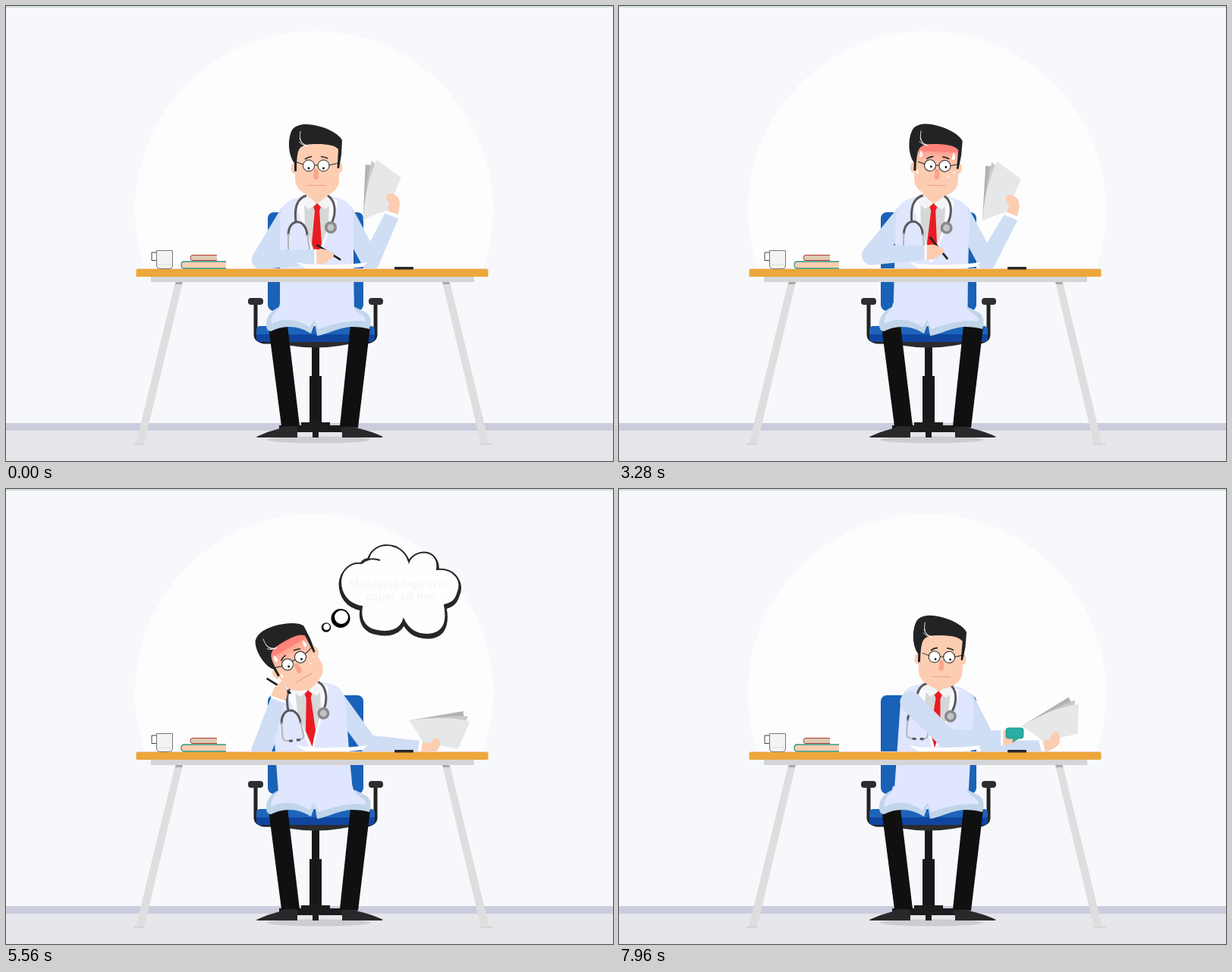
Write an HTML page that moves like this. It is 800 px wide and 600 px high and loops after 8000 ms.

```html
<!DOCTYPE html>
<html lang="en">
<head>
<meta charset="utf-8">
<title>Doctor at the desk</title>
<style>
  html, body { margin: 0; height: 100%; overflow: hidden; background: #f7f8fc; }
  svg { display: block; width: 100vw; height: 100vh; }
  text { font: 14px Inter, "Open Sans", sans-serif; text-anchor: middle; fill: #222; }
  .line { fill: none; stroke: #222; }
  .white { stroke: #fff; }
  .sleeve { fill: #cfdef4; }
  .skin { fill: #fccdb1; }
  .coat { fill: #dfe6fd; }
</style>
</head>
<body>
<svg viewBox="0 0 800 600">
  <defs>
    <clipPath id="aboveDesk"><rect width="800" height="347"/></clipPath>
    <linearGradient id="heat" gradientUnits="userSpaceOnUse" x1="0" y1="180" x2="0" y2="222">
      <stop offset="0" stop-color="#fe7f78"/>
      <stop offset=".29" stop-color="#fe857c"/>
      <stop offset=".3" stop-color="#fda391"/>
      <stop offset="1" stop-color="#fccdb1" stop-opacity="0"/>
    </linearGradient>
    <path id="puff" d="M468 98Q471 92 478 92C482 69 522 66 531 96C538 78 572 78 568 106C590 104 603 120 595 138C592 148 586 151 578 153C583 178 575 192 555 192C540 192 530 185 524 172C520 186 505 190 490 187C473 185 466 172 469 155C450 152 441 138 441 122C442 106 455 96 468 98Z" stroke="#000"/>
  </defs>

  <!-- Room -->
  <rect width="800" height="600" fill="#f7f8fc"/>
  <rect width="800" height="2" fill="#cfdcdb"/>
  <circle cx="406" cy="269" r="236" fill="#fdfdfe" clip-path="url(#aboveDesk)"/>
  <rect y="550" width="800" height="10" fill="#cbccdd"/>
  <rect y="560" width="800" height="40" fill="#e6e7eb"/>

  <!-- Chair -->
  <ellipse cx="412" cy="572" rx="68" ry="4.5" fill="#cdcdd0"/>
  <rect x="345" y="272" width="126" height="130" rx="8" fill="#1962b8"/>
  <path d="M403 448h10v40h3v64h-16v-64h3z" fill="#171918"/>
  <path d="M389 549h38v4h31v9h-46v7h-8v-7h-44v-9h29z" fill="#1b1c1c"/>
  <path d="M329 392V433Q329 441 340 443H476Q487 441 487 433V392" class="line" stroke-width="5"/>
  <path d="M336 441H481L440 448Q408 453 376 448Z" fill="#2b2b2d"/>
  <rect x="319" y="385" width="20" height="9" rx="4" fill="#2e2e30"/>
  <rect x="478" y="385" width="19" height="9" rx="4" fill="#2e2e30"/>
  <rect x="330" y="422" width="156" height="21" rx="5" fill="#1d64ba"/>
  <path d="M330 433H486V438Q486 443 481 443H335Q330 443 330 438Z" fill="#0f459f"/>

  <!-- Trousers and shoes -->
  <path d="M346 423L371 421L387 554H363ZM454 421L480 423L464 556L440 554Z" fill="#101010"/>
  <path d="M330 568Q345 561 361 557Q373 551 384 556V569H331ZM440 557Q453 552 465 557Q482 561 497 568L495 569H443V563Z" fill="#29292b"/>

  <!-- Body -->
  <path id="upperR" class="sleeve"/>
  <path id="upperLBack" class="sleeve"/>
  <g id="torso">
    <path class="coat" d="M361 402V285C361 264 368 257 384 253L396 250H425L437 253C452 257 458 265 458 285V347L459 402Z"/>
    <path d="M385 256L395 250H425L437 257L436 268L411 338L407 338L384 268Z" fill="#fafbfd"/>
    <path d="M393 260H426L425 290L412 326H406L394 290Z" fill="#d6d7d8"/>
    <path class="skin" d="M396 238H424V252L410 262L396 252Z"/>
    <path d="M396 249L410 261L399 268L388 258ZM425 249L410 261L421 268L432 258Z" fill="#f3f4f5"/>
    <path d="M410 260L415 265L413 270L416 313L410 335L403 313L407 270L405 265Z" fill="#ea1b23"/>
    <g class="line" stroke-width="3">
      <path d="M396 250C383 254 380 266 382 285M424 250C434 256 436 272 429 287M372 302C372 279 396 279 397 303" stroke="#59595c"/>
      <path d="M372 300V320Q373 325 381 325M397 301L400 320Q399 324 392 325" stroke="#b3b4b8" stroke-width="2"/>
      <path d="M380 325h5M390 324.5h5" stroke="#555"/>
    </g>
    <circle cx="428" cy="292" r="8" fill="#89898b"/>
    <circle cx="428" cy="292" r="4.5" fill="#c3c3c5"/>
  </g>
  <path d="M360 397C348 402 342 412 343 421Q343 428 349 429C366 420 385 421 402 432L407 418L410 435C426 432 438 424 455 423Q469 423 479 426Q484 410 474 404L460 397Z" fill="#c1d5ea"/>
  <path class="coat" d="M361 392C360 403 347 407 350 419C366 410 387 413 400 424L406 414L412 426C430 420 452 413 474 416C475 406 458 406 457 392Z"/>

  <!-- Head -->
  <g id="head">
    <ellipse class="skin" cx="379.5" cy="214" rx="4" ry="7"/>
    <ellipse class="skin" cx="439.5" cy="213" rx="4" ry="7"/>
    <path class="skin" d="M381 178H439V229Q439 243 424 249Q409 257 395 248Q381 241 381 228Z"/>
    <path id="flush" d="M382 178H439V222H382Z" fill="url(#heat)"/>
    <path d="M380 218V207C371 196 371 172 378 162C386 154 400 155 414 159C426 162 440 170 443 177L442 196L439 214H436.5L438 189C434 184 425 182 410 182C398 182 391 183 387 188C384 192 383 200 383 218Z" fill="#222324"/>
    <path d="M388 165C386 178 390 184 398 184M387 174Q389 182 397 184M386 179Q390 184 398 184" class="line white" stroke-width=".8"/>
    <g id="face">
      <path d="M406 215h5l1 10q-1 4-4 4t-3-4z" fill="#fba48c"/>
      <path d="M397 236.5H421" class="line" style="stroke:#ee9c88"/>
      <path d="M394 202Q398 199 403 198.5M415 198.500Q420 199 424 201" class="line" stroke-width="1.7"/>
      <path d="M383 206L392 209M426 210L438 207M406 210H412" class="line"/>
      <g fill="#fff" stroke="#222">
        <circle cx="399" cy="210.5" r="7.5"/>
        <circle cx="418.5" cy="210.5" r="7.5"/>
      </g>
      <g id="pupils">
        <circle cx="399" cy="210.5" r="1.4"/>
        <circle cx="418.5" cy="210.5" r="1.4"/>
      </g>
    </g>
    <path id="sweat" d="M389 191q4 8 0 9t0-9M432 193q4 8 0 9t0-9M385 217q2 5 0 5t0-5M426 223q1 3 0 3t0-3M434 217q1 3 0 3t0-3" fill="#fff" stroke="#fff" stroke-width=".5"/>
  </g>

  <!-- Right arm with papers, drawn from the wrist -->
  <path id="foreR" class="sleeve"/>
  <g id="handR"><g transform="translate(-509 -277)">
    <path d="M474 210L482 211L471 283Z" fill="#b2b2b3"/>
    <path d="M482 205L490 212L471 283Q475 232 482 205Z" fill="#c8c8c9"/>
    <path d="M489 204L521 227L503 271Q486 275 471 283Q474 235 489 204Z" fill="#e6e7e9"/>
    <path class="skin" d="M503 271L517 276Q521 262 518 255Q514 248 504 248Q500 251 502 256L506 262Z"/>
    <path d="M500 273L518 280" class="line white" stroke-width="3"/>
  </g></g>

  <!-- Left arm with pen, drawn from the wrist -->
  <path id="upperLFront" class="sleeve"/>
  <path id="foreL" class="sleeve"/>
  <g id="handL">
    <path id="pen" d="M0 -6H35" class="line" stroke-width="2.8" stroke-linecap="round"/>
    <path class="skin" d="M0 -9Q9 -12 15 -9L23 -5Q27 0 19 3L15 7Q7 11 0 9Z"/>
    <path d="M0 -10V10" class="line white" stroke-width="3"/>
  </g>

  <!-- Desk -->
  <path d="M382 338Q405 342 430 341Q455 341 477 338L470 344Q440 348 395 346Z" fill="#fff"/>
  <path d="M223 364H233L182 578H171ZM575 364H585L637 578H626Z" fill="#dededf"/>
  <path d="M224 364h9l-1 3h-9zM575 364h9l1 3h-9z" fill="#a9a9aa"/>
  <path d="M168 577h14v2h-14zM625 577h16v2h-16z" fill="#d5d5d7"/>
  <rect x="191" y="357" width="426" height="7" fill="#d5d5d7"/>
  <path d="M173 346.5H634" class="line" style="stroke:#f2cfc4"/>
  <rect x="171.5" y="347" width="464" height="10" rx="1.5" fill="#eda73a"/>
  <rect x="512" y="344" width="25" height="3.5" rx="1" fill="#262628"/>
  <path d="M199 325H192V335.5H199" class="line" style="stroke:#444"/>
  <path d="M198.5 322.5H219.5V343Q219 346.5 215 346.5H203Q199 346.5 198.5 343Z" fill="#f3f3f4" stroke="#777"/>
  <path d="M200 341H218" class="line" style="stroke:#ddd"/>
  <path d="M278 328.5H246Q243 328.5 243 332T246 335.5H278" fill="#dfc9b3" stroke="#b33b32"/>
  <path d="M290 337H235Q231 337 231 341.5T235 346H290" fill="#fccdb1" stroke="#2e9c84" stroke-width="1.3"/>

  <!-- Phone alert -->
  <path id="alert" d="M513 315H530Q533 315 533 318V326Q533 329 530 329H526L519 334L520 329H513Q510 329 510 326V318Q510 315 513 315Z" fill="#2bada3" stroke="#218d86" stroke-width=".8"/>

  <!-- Thought: parts appear one after another -->
  <g class="thought"><circle cx="422" cy="182.5" r="6.2"/><circle cx="422.5" cy="181.8" r="4.3" fill="#fff"/></g>
  <g class="thought"><circle cx="441" cy="170.5" r="12.5"/><circle cx="442" cy="169" r="9" fill="#fff"/></g>
  <g class="thought">
    <use href="#puff" y="3" stroke-width="5"/>
    <use href="#puff" fill="#fff" stroke-width="2"/>
    <path d="M469 98Q479 89 493 94" class="line" style="stroke:#000" stroke-width="2"/>
  </g>
  <g class="thought">
    <text x="517.5" y="130">Managing logs over</text>
    <text x="520" y="147">paper, kill me!</text>
  </g>
</svg>

<script>
const LOOP = 8000;
const $ = id => document.getElementById(id);

// Angles in degrees; each pose changes only what differs from the one before.
const opening = {
  lean: 0, sink: 0, headX: 0, headY: 0, tilt: 0, turn: 0, lookX: 0, lookY: 3.5,
  upperL: 122, foreL: -3, pen: 32, upperR: 62, foreR: -65, papers: 0
};
const writing = { ...opening, turn: -2, lookY: 4, upperL: 130, pen: 39 };
const glancing = { ...writing, lean: 1.6, headX: 7, tilt: 2, turn: 2.4, lookX: 1.5, lookY: 1.5, pen: 51, foreR: -61, papers: 1 };
const tired = { ...glancing, lean: -4.3, sink: 5, headX: -7, headY: 10, tilt: -30, turn: 0, lookX: 0, lookY: 3,
  upperL: 112, foreL: -72, pen: 32, upperR: 54, foreR: 4, papers: 78 };
const reaching = { ...tired, lean: 4, sink: 6, headX: 13, headY: 11, tilt: 1.5, turn: 2.5, lookX: 1.5,
  upperL: 45, foreL: -2, upperR: 63, foreR: -2, papers: 56 };

// The arm with the papers can lag behind the rest of the body.
const moves = [
  { to: writing, from: 0, until: 900 },
  { to: glancing, from: 2100, until: 3200 },
  { to: tired, from: 3360, until: 4800, lag: 2.5 },
  { to: reaching, from: 7440, until: 7960 }
];
const lagging = ['upperR', 'foreR', 'papers'];

function ramp(t, from, until) {
  const u = Math.min(1, Math.max(0, (t - from) / (until - from)));
  return u * u * (3 - 2 * u);
}

function poseAt(t) {
  const pose = { ...opening };
  for (const { to, from, until, lag = 1 } of moves) {
    const u = ramp(t, from, until);
    for (const key in pose) {
      pose[key] += (to[key] - pose[key]) * (lagging.includes(key) ? u ** lag : u);
    }
  }
  return pose;
}

function reach([x, y], length, degrees) {
  const a = degrees * Math.PI / 180;
  return [x + length * Math.cos(a), y + length * Math.sin(a)];
}

// Tapered limb, rounded at p and optionally at q.
function limb([px, py], [qx, qy], a, b, roundEnd) {
  const len = Math.hypot(qx - px, qy - py);
  const nx = (py - qy) / len, ny = (qx - px) / len;
  const end = roundEnd ? `A${b} ${b} 0 0 0 ` : 'L';
  return `M${px + nx * a} ${py + ny * a}L${qx + nx * b} ${qy + ny * b}` +
    `${end}${qx - nx * b} ${qy - ny * b}L${px - nx * a} ${py - ny * a}` +
    `A${a} ${a} 0 0 0 ${px + nx * a} ${py + ny * a}Z`;
}

const shape = (id, d) => $(id).setAttribute('d', d);
const move = (id, value) => $(id).setAttribute('transform', value);
const fade = (id, value) => $(id).setAttribute('opacity', value);

function drawArms(p, crossing) {
  const sway = 2.6 * p.lean;

  const shoulderL = [374 + sway, 275 + p.sink];
  const elbowL = reach(shoulderL, 70, p.upperL);
  const wristL = reach(elbowL, 71, p.foreL);
  const upperL = limb(elbowL, shoulderL, 13, 14, true);
  shape('upperLBack', crossing ? '' : upperL);
  shape('upperLFront', crossing ? upperL : '');
  shape('foreL', limb(elbowL, wristL, 13, 9.5));
  move('handL', `translate(${wristL}) rotate(${p.foreL + 3})`);
  move('pen', `rotate(${p.pen - p.foreL - 3} 17 -6)`);

  const shoulderR = [447 + sway, 274 + p.sink];
  const elbowR = reach(shoulderR, 71, p.upperR);
  const wristR = reach(elbowR, 67, p.foreR);
  shape('upperR', limb(elbowR, shoulderR, 12, 12, true));
  shape('foreR', limb(elbowR, wristR, 12, 9.5));
  move('handR', `translate(${wristR}) rotate(${p.papers})`);
}

function draw(t) {
  const p = poseAt(t);
  move('torso', `translate(0 ${p.sink}) rotate(${p.lean} 408 420)`);
  move('head', `translate(${p.headX} ${p.headY}) rotate(${p.tilt} 409 255)`);
  move('face', `translate(${p.turn} 0)`);
  move('pupils', `translate(${p.lookX} ${p.lookY})`);
  drawArms(p, t > 7560);
  fade('pen', t < 7640 ? 1 : 0);

  const calm = 1 - ramp(t, 7440, 7760);
  fade('flush', ramp(t, 880, 1640) * calm);
  fade('sweat', ramp(t, 1200, 1720) * calm);

  const gone = 1 - ramp(t, 7440, 7640);
  document.querySelectorAll('.thought').forEach((part, i) => {
    const begin = 5080 + 150 * i;
    part.setAttribute('opacity', ramp(t, begin, begin + 240) * gone);
  });
  move('alert', `translate(520 334) scale(${ramp(t, 6560, 6760)}) translate(-520 -334)`);
}

const start = performance.now();
function tick() {
  draw((performance.now() - start) % LOOP);
  requestAnimationFrame(tick);
}
draw(0);
tick();
</script>
</body>
</html>
```
